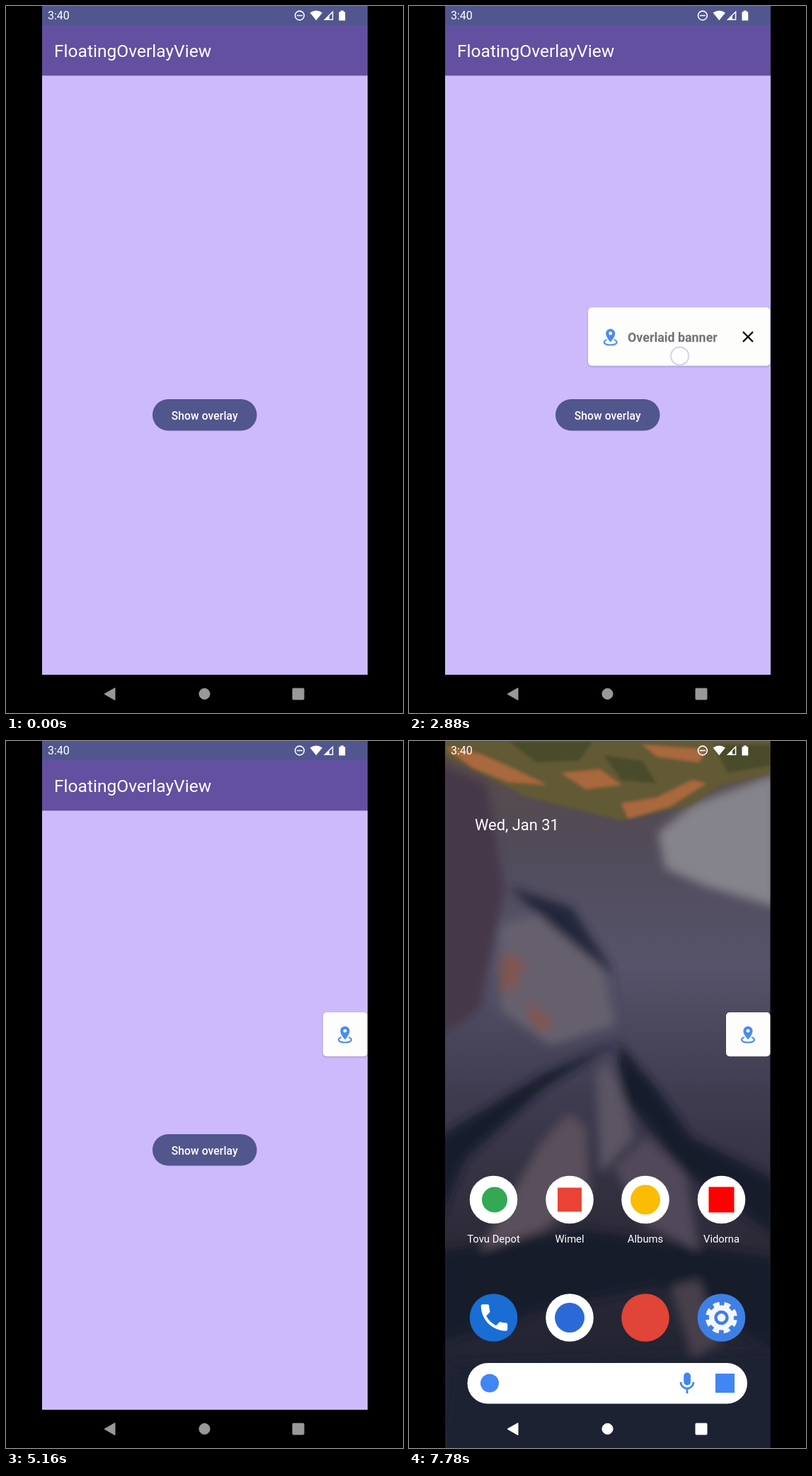
Write an HTML page that moves like this. It is 561 by 998 pixels and loops after 8 s.

```html
<!DOCTYPE html>
<html lang="en">
<head>
<meta charset="utf-8">
<title>Floating overlay demo</title>
<style>
  html, body { margin: 0; width: 100%; height: 100%; overflow: hidden; background: #000; }
  svg { display: block; width: 100%; height: 100%; }
  text { font-family: Roboto, sans-serif; fill: #fff; }

  /* Every part shares one 8 s timeline: 1% = 80 ms. */
  .anim { animation: 8s linear infinite both; }

  #ripple { animation-name: ripple; transform-origin: 281px 578px; }
  @keyframes ripple {
    0%, 7.5% { transform: scale(.25); opacity: 0; }
    8.8% { opacity: .17; }
    13.125% { transform: scale(1); opacity: .22; }
    13.4% { opacity: .21; }
    18.875%, 100% { transform: scale(1); opacity: 0; }
  }

  #tapShow { animation-name: tap-show; }
  @keyframes tap-show {
    0%, 7.49% { opacity: 0; }
    7.5%, 8.75% { opacity: 1; }
    9.5%, 100% { opacity: 0; }
  }

  #tapClose { animation-name: tap-close; }
  @keyframes tap-close {
    0%, 57.87% { opacity: 0; }
    57.875%, 59% { opacity: 1; }
    59.8%, 100% { opacity: 0; }
  }

  #drag { animation-name: drag; }
  @keyframes drag {
    0%, 21.75% { transform: translate(253px, 444.3px); animation-timing-function: cubic-bezier(.4, 0, .7, .8); }
    28.875% { transform: translate(253px, 337px); animation-timing-function: ease-out; }
    31%, 32.25% { transform: translate(253px, 310px); animation-timing-function: ease-in-out; }
    39%, 40.2% { transform: translate(253px, 503px); animation-timing-function: ease-in; }
    41.875% { transform: translate(253px, 492px); }
    43.125% { transform: translate(253px, 439px); animation-timing-function: cubic-bezier(.2, .6, .5, 1); }
    50.75%, 100% { transform: translate(253px, 372.8px); }
  }

  #banner { animation-name: banner; }
  @keyframes banner {
    0%, 10.6% { opacity: 0; }
    12.5%, 59.62% { opacity: 1; }
    59.625%, 100% { opacity: 0; }
  }

  #finger { animation-name: finger; }
  @keyframes finger {
    0%, 21.74% { opacity: 0; transform: translate(128.3px, 67.5px); }
    21.75% { opacity: 1; }
    28.875% { transform: translate(128.3px, 67.5px); }
    43.125% { transform: translate(131px, 69.8px); }
    50% { opacity: 1; }
    50.75%, 100% { opacity: 0; transform: translate(131px, 69.8px); }
  }

  #tile { animation-name: tile; }
  @keyframes tile {
    0%, 59.62% { opacity: 0; transform: translate(253px, 372.8px); }
    59.625% { opacity: 1; transform: translate(253px, 372.8px); animation-timing-function: cubic-bezier(.22, 1, .36, 1); }
    64.4%, 100% { opacity: 1; transform: translate(448px, 383px); }
  }

  #nav { animation-name: nav; }
  @keyframes nav {
    0%, 77.1% { opacity: .6; }
    78.75%, 100% { opacity: 1; }
  }

  #app { animation-name: app-slide; }
  @keyframes app-slide {
    0%, 88.11% { transform: none; }
    88.5% { transform: translateY(46px); }
    88.875% { transform: translateY(79px); }
    89.25% { transform: translateY(100px); }
    90%, 100% { transform: translateY(122px); }
  }

  #appFade { animation-name: app-fade; }
  @keyframes app-fade {
    0%, 88.42% { opacity: 1; }
    88.875% { opacity: .7; }
    89.99%, 100% { opacity: 0; }
  }

  #home { animation-name: home-in; transform-origin: 280.5px 501px; }
  @keyframes home-in {
    0%, 88.11% { transform: scale(.93); animation-timing-function: cubic-bezier(.25, .46, .45, .94); }
    93.5%, 100% { transform: none; }
  }

  #homeFade { animation-name: home-fade; }
  @keyframes home-fade {
    0%, 88.11% { opacity: 0; }
    88.875% { opacity: .75; }
    89.4%, 100% { opacity: 1; }
  }

  .card { fill: #fdfdfc; filter: drop-shadow(0 1px 1.2px rgba(40, 30, 70, .3)); }
  .dot { fill: #fff; fill-opacity: .35; stroke: #c6cae0; stroke-width: 1.6; }
  .label { font-size: 14.8px; text-anchor: middle; }
</style>
</head>
<body>
<svg viewBox="0 0 561 998" preserveAspectRatio="none">
  <defs>
    <clipPath id="screen"><rect x="51" width="459.5" height="998"/></clipPath>
    <clipPath id="pill"><rect x="207" y="555" width="147.5" height="44.5" rx="22.25"/></clipPath>
    <linearGradient id="cliff" x2="0" y2="1">
      <stop offset="0" stop-color="#5c4c42"/>
      <stop offset=".14" stop-color="#514b59"/>
      <stop offset=".32" stop-color="#56536a"/>
      <stop offset=".5" stop-color="#3f3c50"/>
      <stop offset=".72" stop-color="#2b2936"/>
      <stop offset="1" stop-color="#1c2030"/>
    </linearGradient>
    <filter id="soft" x="-20%" y="-20%" width="140%" height="140%"><feGaussianBlur stdDeviation="7"/></filter>
    <filter id="crisp"><feGaussianBlur stdDeviation="2"/></filter>
    <g id="pin">
      <path d="M0 7C-3.4 3.2-6.5-1-6.5-5.3a6.5 6.5 0 0 1 13 0C6.5-1 3.4 3.2 0 7z" fill="#4a8cec"/>
      <circle cy="-5.3" r="2.4" fill="#fdfdfc"/>
      <path d="M-5 3.6C-11.4 5.4-10.6 11 0 11S11.4 5.4 5 3.6" fill="none" stroke="#4a8cec" stroke-width="2"/>
    </g>
  </defs>

  <rect width="561" height="998"/>

  <g clip-path="url(#screen)">
    <g id="wallpaper">
      <rect x="51" width="460" height="998" fill="url(#cliff)"/>
      <g filter="url(#soft)">
        <path d="M352 130L400 90 520 45V235L420 205 362 180z" fill="#85838b"/>
        <path d="M40 30L110 60 135 210 100 380 40 420z" fill="#44394a"/>
        <path d="M130 260L200 240 270 310 292 400 200 430 130 380z" fill="#66606e"/>
        <path d="M130 300L165 310 150 350 128 355zM165 365L200 390 198 412 172 400z" fill="#80574f"/>
        <path d="M140 205L230 235 285 320 300 430 285 330 200 260z" fill="#23263a"/>
        <path d="M295 425L190 490 80 590 40 680V560L190 470zM295 425L350 490 400 560 520 620V700L390 610 300 500z" fill="#141a2c"/>
        <path d="M40 720L250 690 520 730V860L350 770 200 800 40 850z" fill="#171a29"/>
        <path d="M60 880L520 860V1010H40z" fill="#1b2032"/>
        <path d="M185 570L225 525 250 545 255 640 190 690 100 720z" fill="#5a4f5c"/>
        <path d="M265 470L278 452 300 490 318 560 270 610z" fill="#5c5564"/>
        <path d="M290 600L335 560 390 610 410 720 330 680z" fill="#51485a"/>
        <path d="M370 770L410 760 440 850 400 870z" fill="#47404c"/>
      </g>
      <g filter="url(#crisp)">
        <path d="M40-10H520V45L440 62 400 90 365 98 300 112 235 96 165 78 110 50 40 15z" fill="#625a34"/>
        <path d="M51 8L100 18 150 40 195 62 140 58 90 38zM215 45L270 40 300 62 250 68zM300 88L350 80 400 55 420 60 370 92 310 110zM330 5L420 12 410 30 350 22z" fill="#a9683e"/>
        <path d="M140 0H260L240 28 180 30zM275 20L330 28 350 60 300 55zM430 5H511V35L450 45z" fill="#4a4b2b"/>
      </g>
    </g>

    <g id="homeFade" class="anim">
      <g id="home" class="anim">
        <text x="93" y="126" font-size="21.9">Wed, Jan 31</text>
        <g fill="#fff">
          <circle cx="119.5" cy="647.5" r="33.8"/>
          <circle cx="227" cy="647.5" r="33.8"/>
          <circle cx="334" cy="647.5" r="33.8"/>
          <circle cx="441.5" cy="647.5" r="33.8"/>
          <circle cx="227" cy="814" r="33.8"/>
          <rect x="82.5" y="878" width="395.5" height="57.5" rx="28.75"/>
        </g>
        <circle cx="121" cy="647.5" r="18" fill="#34a853"/>
        <rect x="210" y="630.5" width="34" height="34" fill="#ea4335"/>
        <circle cx="334" cy="647.5" r="21" fill="#fbbc04"/>
        <rect x="423.5" y="629.5" width="36" height="36" fill="#f00"/>
        <text class="label" x="119.5" y="708">Tovu Depot</text>
        <text class="label" x="227" y="708">Wimel</text>
        <text class="label" x="334" y="708">Albums</text>
        <text class="label" x="441.5" y="708">Vidorna</text>

        <circle cx="119.5" cy="814" r="33.8" fill="#1a6dd3"/>
        <path transform="translate(95.5 789) scale(2.08)" fill="#fff" d="M6.6 10.8c1.4 2.8 3.8 5.1 6.6 6.6l2.2-2.2c.3-.3.7-.4 1-.2 1.1.4 2.3.5 3.6.5.6 0 1 .5 1 1V20c0 .6-.4 1-1 1C10.6 21 3 13.4 3 4c0-.6.5-1 1-1h3.5c.6 0 1 .4 1 1 0 1.3.2 2.5.6 3.6.1.4 0 .7-.3 1z"/>
        <circle cx="227" cy="814" r="21" fill="#2b69d8"/>
        <circle cx="334" cy="814" r="33.8" fill="#e04537"/>
        <g transform="translate(441.5 814)">
          <circle r="33.8" fill="#3f80e6"/>
          <circle r="17.5" fill="#f4f6fa"/>
          <circle r="19" fill="none" stroke="#f4f6fa" stroke-width="7" stroke-dasharray="8.5 6.42" transform="rotate(9.7)"/>
          <circle r="8" fill="none" stroke="#3f80e6" stroke-width="4.5"/>
        </g>

        <circle cx="114" cy="906.5" r="13" fill="#4285f4"/>
        <g fill="none" stroke="#4285f4" stroke-width="2.8">
          <rect x="389.6" y="893" width="7" height="15" rx="3.5" fill="#4285f4"/>
          <path d="M384 905a9 9 0 0 0 18 0M393 914v7"/>
        </g>
        <rect x="433" y="893" width="27" height="27" fill="#4285f4"/>
      </g>
    </g>

    <g id="appFade" class="anim">
      <g id="app" class="anim">
        <rect x="51" width="460" height="998"/>
        <rect x="51" width="460" height="944" fill="#cdbafd"/>
        <rect x="51" width="460" height="98.3" fill="#6350a0"/>
        <rect x="51" width="460" height="27" fill="#51568f"/>
        <text x="68" y="72" font-size="24.57">FloatingOverlayView</text>
        <g clip-path="url(#pill)">
          <rect x="207" y="555" width="148" height="45" fill="#51568d"/>
          <circle id="ripple" class="anim" cx="281" cy="578" r="80" fill="#fff"/>
        </g>
        <text x="280.7" y="583.6" font-size="15.64" font-weight="500" letter-spacing=".1" text-anchor="middle">Show overlay</text>
      </g>
    </g>

    <g id="drag" class="anim">
      <g id="banner" class="anim">
        <rect class="card" width="257.5" height="82.5" rx="5.5"/>
        <use href="#pin" x="31.7" y="42"/>
        <text x="56" y="48.4" font-size="17.87" font-weight="700" style="fill:#717173">Overlaid banner</text>
        <path d="M219 34.4l14 14m0-14l-14 14" stroke="#000" stroke-width="2.3"/>
      </g>
      <circle id="finger" class="dot anim" r="12.6"/>
    </g>

    <g id="tile" class="anim">
      <rect class="card" width="62.5" height="62.3" rx="5"/>
      <use href="#pin" x="31" y="31.5"/>
    </g>

    <circle id="tapShow" class="dot anim" cx="284" cy="582" r="12.6"/>
    <circle id="tapClose" class="dot anim" cx="479" cy="416" r="12.6"/>
  </g>

  <g id="status" fill="#fff">
    <text x="59" y="19.4" font-size="16">3:40</text>
    <path d="M411 13.5h8M421.3 13.5a6.4 6.4 0 1 0-12.8 0 6.4 6.4 0 1 0 12.8 0" fill="none" stroke="#fff" stroke-width="1.6"/>
    <path d="M438.3 20.3L429.6 9.6Q438.3 3.2 447 9.6z"/>
    <path d="M450.6 19.3L461.6 8.3V19.3z" fill="none" stroke="#fff" stroke-width="1.5"/>
    <path d="M449.5 20L457 12.5V20z"/>
    <path d="M470.5 8.2h2.2V6.4h4.4v1.8h2.2V20.5h-8.8z"/>
  </g>

  <g id="nav" class="anim" fill="#fff" stroke="#fff" stroke-linejoin="round">
    <path d="M139 971.2L154 962.7V979.7z"/>
    <circle cx="280.5" cy="971" r="7.6"/>
    <rect x="405" y="963.2" width="16" height="15.8" rx="1"/>
  </g>
</svg>
</body>
</html>
```
